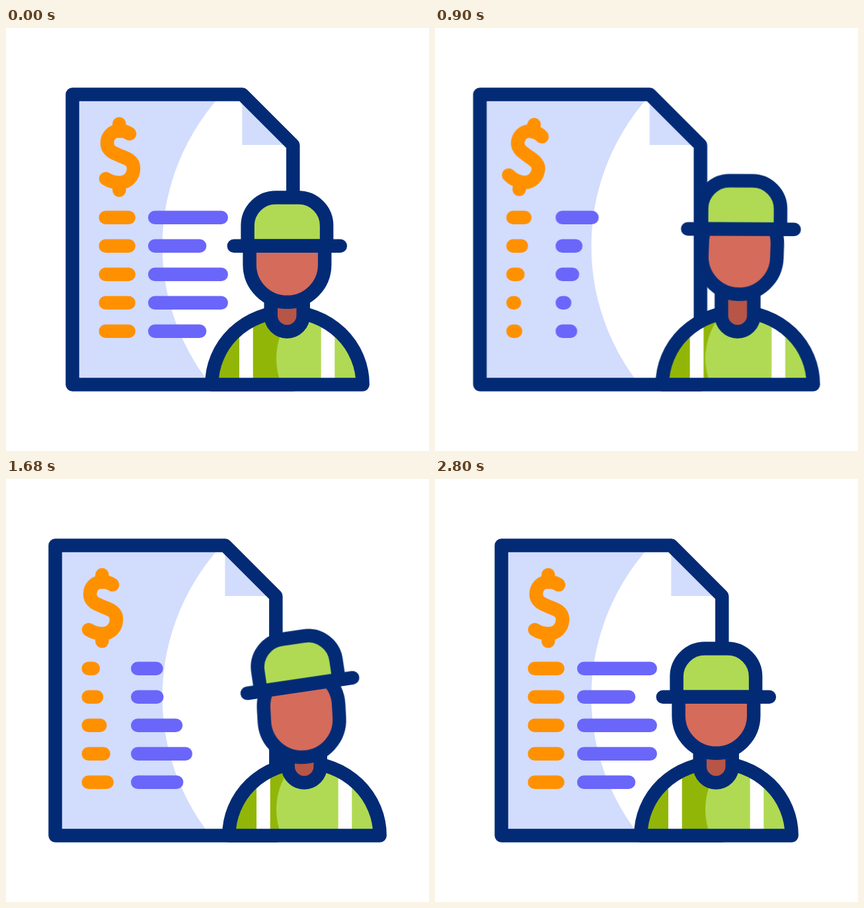
Recreate the animation shown at these times as an HTML page without scripts. Size 640 px wide and 640 px high, loop 3600 ms.

```html
<!DOCTYPE html>
<html lang="en">
<head>
<meta charset="utf-8">
<title>Worker invoice</title>
<style>
  html, body { margin: 0; width: 100%; height: 100%; overflow: hidden; background: #fff; }
  svg { display: block; width: 100vw; height: 100vh; }

  .line { fill: none; stroke: #032b75; stroke-width: 20.5; stroke-linecap: round; stroke-linejoin: round; }
  .pale { fill: #d2dcfd; }
  .lime { fill: #b0da53; }
  .olive { fill: #92b608; }
  .white { fill: #fff; }
  .face { fill: #d56b5b; }
  .neck { fill: #b75547; }
  .orange { stroke: #ff9100; }
  .purple { stroke: #6a66fa; }

  .left, .right, .dollar, .head, .hat, .bar {
    animation: 3600ms infinite cubic-bezier(.333, 0, .667, 1);
  }
  .left, .right { animation-name: slide; }
  .left { --x: -38.8px; }
  .right { --x: 38.8px; }
  .dollar { animation-name: swing; transform-origin: 171.5px 195px; }
  .head { animation-name: nod; transform-origin: 425.5px 425px; }
  .hat { animation-name: pop; transform-origin: 425.5px 330px; }
  .bar {
    animation-name: shrink;
    animation-timing-function: linear;
    animation-delay: calc((var(--row) * 90 + var(--lag) - 3600) * 1ms);
    stroke-dasharray: 100 300;
  }
  .orange { --lag: 0; --min: .7; }
  .purple { --lag: 40; --min: 2; }
  .row0 { --row: 0; }
  .row1 { --row: 1; }
  .row2 { --row: 2; }
  .row3 { --row: 3; }
  .row4 { --row: 4; }

  @keyframes slide {
    0%, 67.8%, 100% { transform: translateX(0); }
    33.5% { transform: translateX(var(--x)); }
  }
  @keyframes swing {
    0%, 41.7%, 100% { transform: rotate(0deg); }
    8.33% { transform: rotate(16deg); }
    16.4% { transform: rotate(-18.6deg); }
    25.1% { transform: rotate(13deg); }
    33.33% { transform: rotate(-13.5deg); }
  }
  @keyframes nod {
    0%, 67.8%, 100% { transform: translateY(0) rotate(0deg); }
    16.11% { transform: translateY(10px) rotate(-4.5deg); }
    25% { transform: translateY(-12px) rotate(2.1deg); }
    38.33% { transform: translateY(11px) rotate(-2.3deg); }
    46.67% { transform: translateY(6px) rotate(-3.2deg); }
    62.22% { transform: translateY(0) rotate(1.2deg); }
  }
  @keyframes pop {
    0%, 67.8%, 100% { transform: translate(0, 0) rotate(0deg); }
    16.11% { transform: translate(0, -24.5px) rotate(-4.4deg); }
    25% { transform: translate(1px, -13.5px) rotate(-1.8deg); }
    38.33% { transform: translate(-2px, -13px) rotate(2.5deg); }
    46.67% { transform: translate(0, -23.5px) rotate(-5.2deg); }
    62.22% { transform: translate(-1px, 5px) rotate(3.6deg); }
  }
  @keyframes shrink {
    0%, 33.333%, 66.667%, 100% { stroke-dasharray: 100 300; }
    16.667%, 50% { stroke-dasharray: var(--min) 300; }
  }
</style>
</head>
<body>
<svg viewBox="0 0 640 640">
  <defs>
    <path id="page" d="M100.5 100.5H357.5L434.3 177.3V539.5H100.5Z"/>
    <path id="torso" d="M311.3 539.5A114.2 110 0 0 1 539.7 539.5Z"/>
    <clipPath id="vest"><use href="#torso"/></clipPath>
  </defs>

  <!-- invoice: the white highlight stays put while the page slides -->
  <use href="#page" class="pale left"/>
  <circle class="white" cx="574.5" cy="330" r="338"/>
  <g class="left">
    <path class="pale" d="M357.3 100.5V177H434Z"/>
    <use href="#page" class="line"/>
    <path class="line orange dollar" d="M187 160C182 156.500 177 155.500 172 155.500C160 155.500 153 164 153 174C153 186 163 189 173 193.500C184 197.500 193 201 193 212C193 225 184 234 172 234C163 234 157 232 151 228M171.300 145V156M171.300 234V245.500"/>
    <g class="row0">
      <path class="line bar orange" pathLength="100" d="M150.700 286.700H185.600"/>
      <path class="line bar purple" pathLength="100" d="M225.200 286.700H325.700"/>
    </g>
    <g class="row1">
      <path class="line bar orange" pathLength="100" d="M150.700 329.700H185.600"/>
      <path class="line bar purple" pathLength="100" d="M225.200 329.700H293"/>
    </g>
    <g class="row2">
      <path class="line bar orange" pathLength="100" d="M150.700 372.700H185.600"/>
      <path class="line bar purple" pathLength="100" d="M225.200 372.700H325.700"/>
    </g>
    <g class="row3">
      <path class="line bar orange" pathLength="100" d="M150.700 415.700H185.600"/>
      <path class="line bar purple" pathLength="100" d="M225.200 415.700H325.700"/>
    </g>
    <g class="row4">
      <path class="line bar orange" pathLength="100" d="M150.700 458.700H185.600"/>
      <path class="line bar purple" pathLength="100" d="M225.200 458.700H293"/>
    </g>
  </g>

  <!-- worker -->
  <g class="right">
    <g clip-path="url(#vest)">
      <use href="#torso" class="olive"/>
      <circle class="lime left" cx="514" cy="500" r="105"/>
      <path class="white" d="M353 420H373.700V540H353ZM476.700 420H497.300V540H476.700Z"/>
    </g>
    <use href="#torso" class="line"/>
    <path class="line neck" style="fill:#b75547" d="M400.700 385V435a24.500 24.500 0 0 0 49 0V385"/>
    <g class="head">
      <path class="line" style="fill:#d56b5b" d="M368.600 338V358a56.800 56.800 0 0 0 113.600 0V338a56.800 56.800 0 0 0 -113.600 0Z"/>
      <g class="hat">
        <path class="line" style="fill:#b0da53" d="M365.600 329.700V299a42.500 42.500 0 0 1 42.500 -42.500H442.600a42.500 42.500 0 0 1 42.500 42.500V329.700Z"/>
        <path class="line" d="M344.800 329.700H505.800"/>
      </g>
    </g>
  </g>
</svg>
</body>
</html>
```
